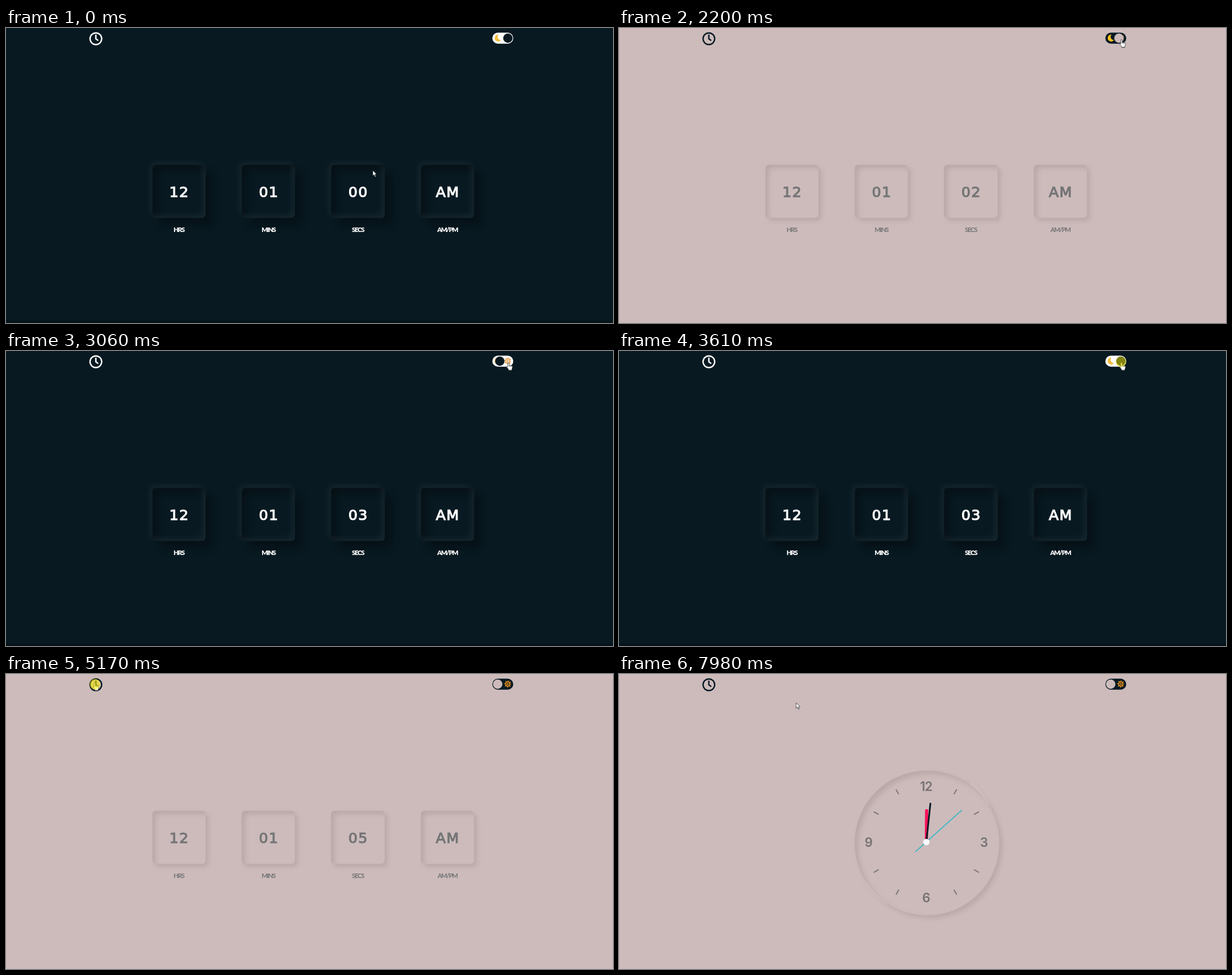
Animation of 1074x522 px, one loop 8 s. Source, as an HTML page:

```html
<!DOCTYPE html>
<html lang="en">
<head>
<meta charset="utf-8">
<title>Clock</title>
<style>
html, body { margin: 0; width: 100%; height: 100%; overflow: hidden; }
body, body * { animation-duration: 8s; animation-iteration-count: infinite; animation-timing-function: linear; }
body { position: relative; background: var(--bg); animation-name: theme; animation-timing-function: step-end; }

@keyframes theme {
  0%, 38.25% {
    --bg: #081921; --ink: #fff; --text: #fff; --edge: #06131a; --moon: #f3bd3c; --sun: #e8963a; --bold: 900;
    --card: -4px -4px 12px rgba(255,255,255,.06), 13px 13px 14px rgba(0,0,0,.3),
      inset -4px -4px 12px rgba(255,255,255,.07), inset 9px 9px 14px rgba(0,0,0,.33);
  }
  27.5%, 47%, 100% {
    --bg: #cdbbbb; --ink: #071a24; --text: #747576; --edge: #cdbbbb; --moon: #fcc21b; --sun: #f8981d; --bold: 700;
    --card: 5px 5px 8px #baa8a8, inset 6px 6px 8px #baa8a8;
  }
}

#edge { position: absolute; left: 0; right: 0; top: 518px; height: 4px; background: var(--edge); }
#digital { position: absolute; inset: 0; animation-name: digital; animation-timing-function: step-end; }
@keyframes digital { 0% { visibility: visible; } 66.5%, 100% { visibility: hidden; } }

.card {
  position: absolute; top: 242px; width: 94.4px; height: 94.4px; border-radius: 6px;
  box-shadow: var(--card); color: var(--text); text-align: center;
}
.value {
  position: absolute; left: 0; right: 0; top: 28px; height: 40px; overflow: hidden;
  font: 25.5px/40px "DejaVu Sans", sans-serif; letter-spacing: 1.3px; text-indent: 1.3px;
  -webkit-text-stroke: 1.2px var(--text);
}
.value b { display: block; font-weight: 400; }
.label {
  position: absolute; left: 0; right: 1.4px; top: 106px; text-indent: 1.4px;
  font: 11.5px/18px Lato, sans-serif; font-weight: var(--bold); letter-spacing: -1.4px;
}
#secs { animation-name: secs; animation-timing-function: step-end; }
@keyframes secs {
  0% { transform: none; }
  10.25% { transform: translateY(-40px); }
  22.75% { transform: translateY(-80px); }
  35.375% { transform: translateY(-120px); }
  47.875% { transform: translateY(-160px); }
  60.375%, 100% { transform: translateY(-200px); }
}

#analog { position: absolute; inset: 0; animation-name: analog; animation-timing-function: step-end; }
@keyframes analog { 0% { visibility: hidden; } 66.5%, 100% { visibility: visible; } }
#dial {
  position: absolute; left: 417.4px; top: 171px; width: 255.6px; height: 255.6px; border-radius: 50%;
  box-shadow: 5px 5px 8px #baa8a8, inset 6px 6px 8px #baa8a8;
}
#second { animation-name: second; animation-timing-function: step-end; }
@keyframes second {
  0% { transform: rotate(30deg); }
  72.375% { transform: rotate(36deg); }
  85.125% { transform: rotate(42deg); }
  97.875%, 100% { transform: rotate(48deg); }
}

svg { position: absolute; left: 0; top: 0; overflow: hidden; }
.ink { stroke: var(--ink); fill: none; }
#pill { fill: var(--ink); }
#moon { fill: var(--moon); }
#sun { stroke: var(--sun); fill: none; }
#knob { fill: var(--bg); animation-name: knob; animation-timing-function: ease; }
@keyframes knob {
  0%, 27%, 41.2%, 46.95% { transform: none; }
  30.375%, 37.7%, 50.25%, 100% { transform: translateX(-18px); }
}

#pointer { animation-name: pointer; }
@keyframes pointer {
  0%, 2.5% { transform: translate(649px, 252px); animation-timing-function: ease-in-out; }
  13% { transform: translate(876px, 38px); }
  17.75% { transform: translate(887px, 22px); }
  19.875% { transform: translate(888px, 21px); }
  22.75%, 50.75% { transform: translate(889px, 20.5px); animation-timing-function: ease-in; }
  56.6% { transform: translate(420px, 62px); animation-timing-function: ease-out; }
  61.25% { transform: translate(126px, 28px); }
  63.75%, 74.5% { transform: translate(157px, 15.5px); }
  78.25%, 93% { transform: translate(135.5px, 12px); }
  94.75% { transform: translate(62px, 0); }
  95.75% { transform: translate(40px, -22px); }
  97% { transform: translate(100px, -22px); }
  97.875% { transform: translate(154px, 3px); }
  99.75%, 100% { transform: translate(313.5px, 51px); }
}
#arrow, #hand { fill: #fff; stroke: #14181c; stroke-width: .7; stroke-linejoin: round; animation-timing-function: step-end; }
#arrow { animation-name: arrow; }
#hand { animation-name: hand; }
@keyframes arrow { 0%, 51.25%, 76.5%, 100% { opacity: 1; } 19.875%, 63.25% { opacity: 0; } }
@keyframes hand { 0%, 51.25%, 76.5%, 100% { opacity: 0; } 19.875%, 63.25% { opacity: 1; } }

#click { fill: #f7ea00; animation-name: click; animation-timing-function: step-end; }
@keyframes click {
  0%, 27.5%, 38.25%, 47%, 66.5%, 100% { opacity: 0; transform: translate(888px, 19px); }
  25.625%, 36.375%, 45.125% { opacity: .52; transform: translate(888px, 19px); }
  64.625% { opacity: .58; transform: translate(157.5px, 18px); }
}
</style>
</head>
<body>
<div id="edge"></div>

<div id="digital">
  <div class="card" style="left:258.6px"><div class="value"><b>12</b></div><div class="label">HRS</div></div>
  <div class="card" style="left:417.1px"><div class="value"><b>01</b></div><div class="label">MINS</div></div>
  <div class="card" style="left:575.4px">
    <div class="value"><div id="secs"><b>00</b><b>01</b><b>02</b><b>03</b><b>04</b><b>05</b></div></div>
    <div class="label">SECS</div>
  </div>
  <div class="card" style="left:733.8px"><div class="value"><b>AM</b></div><div class="label">AM/PM</div></div>
</div>

<div id="analog">
  <div id="dial"></div>
  <svg width="1074" height="522">
    <g fill="none" stroke="#dccdcd" stroke-width="1.2" stroke-linecap="round" opacity=".75">
      <path d="M622 193A130 130 0 0 1 654 230"/>
      <path d="M437 369A130 130 0 0 0 473 406"/>
    </g>
    <g transform="translate(543.8 297.3)">
      <g stroke="#7b7576" stroke-width="2">
        <path id="tick" d="M0-107.5V-97.5" transform="rotate(30)"/>
        <use href="#tick" transform="rotate(30)"/>
        <use href="#tick" transform="rotate(90)"/>
        <use href="#tick" transform="rotate(120)"/>
        <use href="#tick" transform="rotate(180)"/>
        <use href="#tick" transform="rotate(210)"/>
        <use href="#tick" transform="rotate(270)"/>
        <use href="#tick" transform="rotate(300)"/>
      </g>
      <g fill="#777273" font-family="Inter, sans-serif" font-weight="600" font-size="22.5" text-anchor="middle">
        <text x="-.5" y="-90.8" letter-spacing="-1">12</text>
        <text x="102" y="8.2">3</text>
        <text y="107.2">6</text>
        <text x="-102" y="8.2">9</text>
      </g>
      <g stroke-linecap="round">
        <path d="M0 0V-55.5" stroke="#fb1259" stroke-width="5.6" transform="rotate(.5)"/>
        <path d="M0 0V-69.5" stroke="#071a24" stroke-width="3" stroke-linecap="butt" transform="rotate(6)"/>
        <path id="second" d="M0 26V-84.5" stroke="#1fb5c4" stroke-width="1.5" stroke-linecap="butt"/>
      </g>
      <circle r="5.6" fill="#fff"/>
    </g>
  </svg>
</div>

<svg width="1074" height="522">
  <g class="ink" stroke-width="2.4">
    <circle cx="159" cy="19" r="10.3"/>
    <path d="M159 11.8V19.2L163.2 22.2" stroke-width="2.5"/>
  </g>
  <rect id="pill" x="860.5" y="8.3" width="37" height="19.4" rx="9.7"/>
  <path id="moon" d="M871.5 11.8a6 6 0 1 0 4.4 9.2 5.4 5.4 0 0 1-4.4-9.2Z"/>
  <g id="sun">
    <circle cx="887.8" cy="17.6" r="3.6" stroke-width="1.6"/>
    <circle cx="887.8" cy="17.6" r="1" stroke-width="1.4"/>
    <circle cx="887.8" cy="17.6" r="5.2" stroke-width="1.8" stroke-dasharray="1.9 2.184" stroke-dashoffset=".95"/>
  </g>
  <circle id="knob" cx="888" cy="18" r="8.3"/>
  <g id="pointer">
    <path id="arrow" d="M0 0V9.6L2.2 7.6 3.9 11.4 5.5 10.7 3.8 7H6.8Z"/>
    <g id="hand">
      <path d="M-1.2 1.1a1.2 1.2 0 0 1 2.4 0V5q1-.9 2 .2 1.1-.6 1.9.5 1.4-.4 1.9.9V9.5L6 12v1.5H.5L-.6 11-3.6 7.6q.5-1.5 2.4 0Z"/>
      <path d="M1.2 5V7M3.2 5.2V7.2M5.1 5.7V7.4" fill="none"/>
    </g>
  </g>
  <circle id="click" r="9.2"/>
</svg>
</body>
</html>
```
